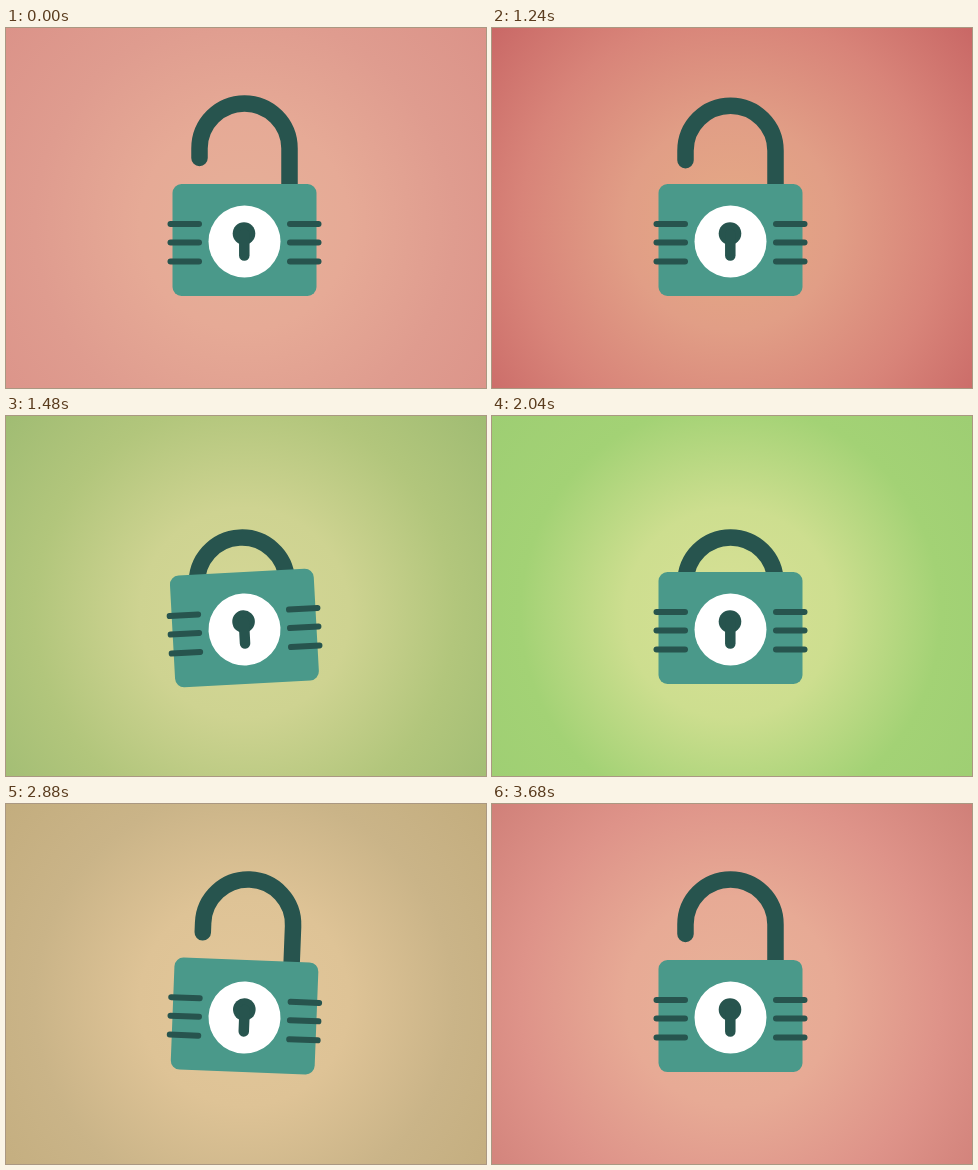
An HTML page with a canvas that plays this animation: 480 by 360 pixels, repeating every 3.72 s.

```html
<!DOCTYPE html>
<html lang="en">
<head>
<meta charset="utf-8">
<title>Padlock</title>
<style>
  html, body { margin: 0; width: 100%; height: 100%; overflow: hidden; }
  canvas { display: block; }
</style>
</head>
<body>
<canvas width="480" height="360"></canvas>
<script>
const ctx = document.querySelector('canvas').getContext('2d');
const LOOP = 3720, STEP = 40;
const DARK = '#27544e', TEAL = '#4a998a';
const CX = 238.5, CY = 213.5;

// Gradient colours from the centre outwards
const STOPS = [0, 105 / 310, 210 / 310, 1];
const peach = [[232, 186, 156], [230, 181, 153], [221, 165, 145], [214, 156, 132]];
const pink = [[232, 178, 152], [231, 170, 149], [222, 147, 137], [208, 128, 121]];
const rose = [[230, 176, 152], [230, 170, 150], [223, 156, 143], [219, 147, 137]];
const red = [[229, 170, 133], [225, 158, 134], [216, 132, 121], [201, 104, 102]];
const olive = [[213, 215, 150], [206, 211, 145], [178, 198, 124], [160, 188, 115]];
const green = [[216, 224, 150], [205, 222, 143], [163, 210, 117], [158, 206, 115]];
const MOODS = [
  [0, rose], [560, red], [1250, red], [1480, olive], [1700, green],
  [2720, green], [2960, peach], [3680, pink], [LOOP, rose]
];

const clamp = x => Math.min(1, Math.max(0, x));
const progress = (t, from, to) => clamp((t - from) / (to - from));
const backIn = (x, s = 1.4) => x * x * ((s + 1) * x - s);
const easeOut = x => 1 - (1 - x) ** 3;

// Damped swing in degrees after an impact
const swing = (t, size) =>
  t < 0 ? 0 : size * Math.exp(-t / 150) * Math.sin(2 * Math.PI * t / 320);

function background(t) {
  const next = MOODS.findIndex(([time]) => time > t);
  const [start, from] = MOODS[next - 1], [end, to] = MOODS[next];
  const k = progress(t, start, end);
  const gradient = ctx.createRadialGradient(CX, 197, 0, CX, 197, 310);
  STOPS.forEach((stop, i) => {
    const rgb = from[i].map((v, c) => Math.round(v + (to[i][c] - v) * k));
    gradient.addColorStop(stop, `rgb(${rgb})`);
  });
  ctx.fillStyle = gradient;
  ctx.fillRect(0, 0, 480, 360);
}

function stroke(width, ...points) {
  ctx.lineWidth = width;
  ctx.beginPath();
  points.forEach(([x, y]) => ctx.lineTo(x, y));
  ctx.stroke();
}

function disc(x, y, r, fill) {
  ctx.fillStyle = fill;
  ctx.beginPath();
  ctx.arc(x, y, r, 0, 2 * Math.PI);
  ctx.fill();
}

function shackle(drop) {
  ctx.lineWidth = 16.5;
  ctx.beginPath();
  ctx.moveTo(CX - 45, 130 + drop);
  ctx.arc(CX, 120.5 + drop, 45, Math.PI, 0);
  ctx.lineTo(CX + 45, 170 + drop);
  ctx.stroke();
}

function lock(drop, angle) {
  ctx.save();
  ctx.translate(CX, CY);
  ctx.rotate(angle * Math.PI / 180);
  ctx.translate(-CX, -CY);
  ctx.strokeStyle = DARK;
  ctx.lineCap = 'round';
  shackle(drop);

  ctx.fillStyle = TEAL;
  ctx.beginPath();
  ctx.roundRect(166.5, 156, 144, 112, 9);
  ctx.fill();
  for (const y of [196, 214.5, 233.5]) {
    stroke(6, [164.5, y], [193, y]);
    stroke(6, [284, y], [312.5, y]);
  }

  disc(CX, CY, 36, '#fff');
  disc(238, 205.5, 11.3, DARK);
  stroke(10.5, [238.3, 206], [238.3, 227.5]);
  ctx.restore();
}

function draw(now) {
  const t = Math.floor(now % LOOP / STEP) * STEP;
  const closed = backIn(progress(t, 964, 1400)) - easeOut(progress(t, 2720, 2850));
  background(t);
  lock(46 * closed, swing(t - 1400, -5.3) + swing(t - 2840, 4.1));
  requestAnimationFrame(draw);
}
requestAnimationFrame(draw);
</script>
</body>
</html>
```
